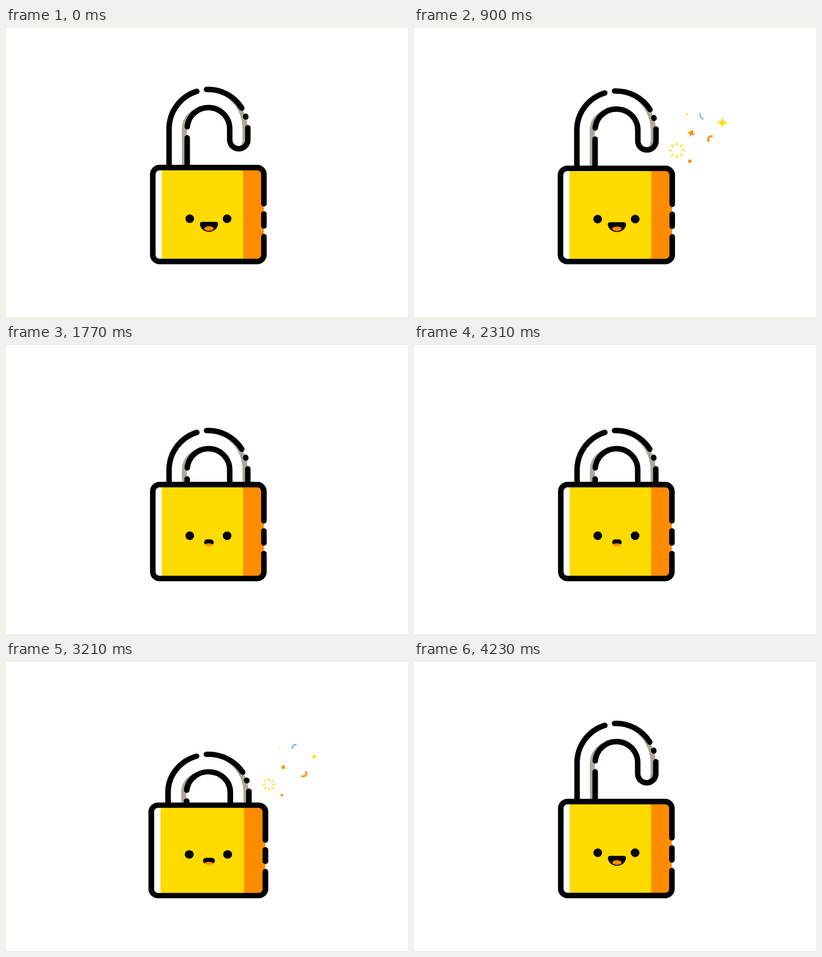
An HTML page with a canvas that plays this animation: 832 by 600 pixels, repeating every 4.26 s.

```html
<!DOCTYPE html>
<html lang="en">
<head>
<meta charset="utf-8">
<title>Padlock</title>
<style>
html, body { margin: 0; width: 100%; height: 100%; overflow: hidden; background: #fff; }
canvas { display: block; }
</style>
</head>
<body>
<canvas id="stage" width="832" height="600"></canvas>
<script>
const g = document.getElementById('stage').getContext('2d');
const LOOP = 4260, SPARK_END = 1260;
const BLACK = '#000303', YELLOW = '#ffdb00', ORANGE = '#ff8c00', BLUE = '#3fb4f2', GRAY = '#aca79d';
const { PI, sin, cos, min, max } = Math;

const mix = (a, b, p) => a + (b - a) * p;
const span = (t, a, b) => min(1, max(0, (t - a) / (b - a)));   // linear 0 to 1
const ramp = (t, a, b) => (1 - cos(PI * span(t, a, b))) / 2;   // eased 0 to 1
const arch = (t, a, b) => sin(PI * span(t, a, b));             // 0 to 1 to 0
const hump = (t, a, b) => arch(t, a, b) ** 2;                  // the same with soft ends

const tube = new Path2D('M356.25 400V209A62.75 62.75 0 0 1 481.75 209V232');
const shackle = new Path2D('M337.5 400V209A81.5 81.5 0 0 1 395 131.5 M415 127.6A81.5 81.5 0 0 1 488 166.3' +
  'M496 183.2l.4 1.5 M500.5 207V232A18.75 18.75 0 0 1 463 232V209A44 44 0 0 0 375.2 205 M375 228V400');
const frame = new Path2D('M533.8 365V304A14 14 0 0 0 519.8 289.8H317.8A14 14 0 0 0 303.8 303.8V470.8' +
  'A14 14 0 0 0 317.8 484.8H519.8A14 14 0 0 0 533.8 470.8V433 M533.8 386V411');

function stroke(path, color, width, cap = 'round') {
  g.strokeStyle = color;
  g.lineWidth = width;
  g.lineCap = cap;
  g.stroke(path);
}

function box(x, y, w, h, r, color) {
  g.fillStyle = color;
  g.beginPath();
  g.roundRect(x, y, w, h, r);
  g.fill();
}

function oval(x, y, rx, ry, color) {
  g.fillStyle = color;
  g.beginPath();
  g.ellipse(x, y, rx, ry, 0, 0, 2 * PI);
  g.fill();
}

function drawShackle(dy) {
  g.save();
  g.translate(0, dy);
  stroke(tube, GRAY, 36.5);
  g.translate(-10.5, 0);
  stroke(tube, '#fff', 36.5);
  g.translate(10.5, 0);
  stroke(shackle, BLACK, 11.4);
  g.restore();
}

function drawBody() {
  box(303.8, 289.8, 230, 195, 14, '#fff');
  box(480, 289.8, 53.6, 195, [0, 14, 14, 0], ORANGE);
  box(322, 293, 169, 189, 7, YELLOW);
  stroke(frame, BLACK, 11.5);
}

function drawFace(open, worry) {
  for (const x of [380.3, 457.6]) oval(x, 396 - (1 - open), 8 + open, 9 * open, BLACK);
  const part = (smile, sad) => mix(smile, sad, worry);
  const x = 420, w = part(18.6, 9.9), top = part(402.6, 403.4), side = part(407, 410.8);
  const corner = w * part(.25, .7);
  g.fillStyle = BLACK;
  g.beginPath();
  g.moveTo(x - w, side);
  g.quadraticCurveTo(x - w, top, x - w + corner, top);
  g.lineTo(x + w - corner, top);
  g.quadraticCurveTo(x + w, top, x + w, side);
  g.ellipse(x, side, w, part(16, 4.8), 0, 0, PI);
  g.fill();
  oval(x, part(416.4, 414.9), part(9.6, 8), part(4.8, 3.1), ORANGE);
}

function drawLock(t) {
  const stretch = .0146 * hump(t, 960, 1500) + .021 * hump(t, 3020, 3180)
    - .034 * hump(t, 480, 980) - .032 * hump(t, 2680, 3080) - .08 * hump(t, 3130, 3470);
  const slide = 76 * ramp(t, 1210, 1740) - 26 * ramp(t, 1040, 1210) - 50 * ramp(t, 3300, 3920);
  const blink = hump(t, 1150, 1310) + hump(t, 3230, 3410);
  g.save();
  g.translate(418.8, 490.5);
  g.scale(1 - stretch * (stretch > 0 ? 2 : .72), 1 + stretch);
  g.translate(-418.8, -490.5);
  drawShackle(slide - 70 * stretch);
  drawBody();
  drawFace(1 - .95 * blink, ramp(t, 1120, 1340) - ramp(t, 3120, 3400));
  g.restore();
}

function star(x, y, r, turn, color) {
  g.save();
  g.translate(x, y);
  g.rotate(turn);
  g.beginPath();
  g.moveTo(r, 0);
  for (let i = 1; i <= 4; i++) {
    const a = i * PI / 2, mid = a - PI / 4, waist = .15 * r;
    g.quadraticCurveTo(waist * cos(mid), waist * sin(mid), r * cos(a), r * sin(a));
  }
  g.closePath();
  g.fillStyle = g.strokeStyle = color;
  g.lineJoin = 'round';
  g.lineWidth = r * .12 + .01;
  g.fill();
  g.stroke();
  g.restore();
}

// An arc whose head runs ahead while its tail catches up; angles in degrees.
function curl(p, x, y, r, start, turn, from, color, width) {
  if (p <= from || p >= SPARK_END) return;
  const head = start + turn * span(p, from, from + 530);
  const tail = start + turn * span(p, from + 80, SPARK_END) ** 1.6;
  const path = new Path2D();
  path.arc(x, y, r, tail * PI / 180, head * PI / 180, turn < 0);
  stroke(path, color, width, 'butt');
}

function burst(p, x, y) {
  if (p <= 500 || p >= SPARK_END) return;
  const inner = mix(20, 7.4, span(p, 500, 1000)), outer = mix(20, 9, span(p, 750, SPARK_END));
  const rays = new Path2D();
  for (let a = 0; a < 2 * PI; a += PI / 4) {
    rays.moveTo(x + inner * cos(a), y + inner * sin(a));
    rays.lineTo(x + outer * cos(a), y + outer * sin(a));
  }
  stroke(rays, YELLOW, 2.5, 'butt');
}

function drawSparks(p) {
  const dot = (x, y, r, color) => oval(x, y, r, r, color);
  star(638, 196.5, 10.5 * arch(p, 400, 1230), .3 * (1 - span(p, 500, 1000)), YELLOW);
  star(574, 218.5, 7.8 * arch(p, 525, 1290), .6 * span(p, 630, 1080), ORANGE);
  dot(565, 179, 2 * arch(p, 490, 1200), YELLOW);
  dot(591, 251, 1.3 * arch(p, 480, 1000), YELLOW);
  dot(570.8, 276.5, 3.5 * arch(p, 560, 1265), ORANGE);
  burst(p, 544, 254);
  curl(p, 601, 180, 9, 32, 240, 520, BLUE, 2.3);
  curl(p, 615.2, 231, 6.5, 32, -487, 615, ORANGE, mix(1.5, 3.7, span(p, 615, 900)));
}

function draw(now) {
  const t = now % LOOP;
  g.fillStyle = '#fff';
  g.fillRect(0, 0, 832, 600);
  drawLock(t);
  drawSparks(t % (LOOP / 2));
  requestAnimationFrame(draw);
}
requestAnimationFrame(draw);
</script>
</body>
</html>
```
